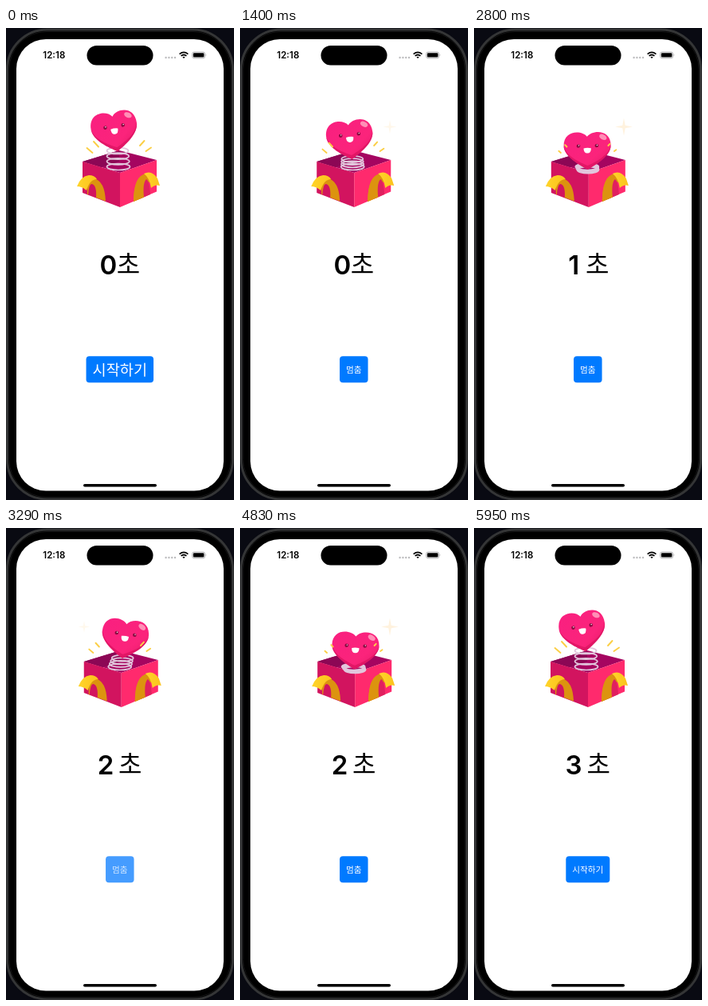
An HTML page that plays this animation: 286 px wide and 590 px high, repeating every 8260 ms.

```html
<!DOCTYPE html>
<html lang="ko">
<head>
<meta charset="utf-8">
<title>Gift timer</title>
<style>
  html, body { margin: 0; width: 100%; height: 100%; overflow: hidden; background: #090a12; }
  svg { display: block; width: 286px; height: 590px; }
  text { text-anchor: middle; }
  .num { font: 600 33px Inter, sans-serif; }
  .ko { font-family: "Noto Sans CJK KR", "Noto Sans CJK", "Noto Sans CJK JP", sans-serif; }
</style>
</head>
<body>
<svg viewBox="0 0 286 590">
  <defs>
    <linearGradient id="skin" x1="0" y1="0" x2="1" y2="1">
      <stop offset="0" stop-color="#f91f80"/>
      <stop offset=".65" stop-color="#fb247b"/>
      <stop offset="1" stop-color="#e51868"/>
    </linearGradient>
    <linearGradient id="leaf" x1="0" x2="1">
      <stop offset="0" stop-color="#ffd42a"/>
      <stop offset="1" stop-color="#fbc21c"/>
    </linearGradient>
  </defs>

  <!-- phone -->
  <rect x="1.5" y="2" width="283" height="587" rx="50" fill="#000" stroke="#343536" stroke-width="3"/>
  <rect x="4" y="4.5" width="278" height="582" rx="47" fill="none" stroke="#151516"/>
  <rect x="13" y="14" width="260" height="564.5" rx="37" fill="#fff"/>
  <rect x="101.5" y="22" width="83" height="24.5" rx="12.2"/>
  <rect x="97" y="570" width="92" height="3.4" rx="1.7"/>

  <!-- status bar -->
  <text x="60.3" y="38" style="font:600 11.5px Inter,sans-serif">12:18</text>
  <g fill="#bcbcbe">
    <circle cx="200.6" cy="37" r="1.2"/><circle cx="204.4" cy="37" r="1.2"/>
    <circle cx="208.2" cy="37" r="1.2"/><circle cx="212" cy="37" r="1.2"/>
  </g>
  <g fill="none" stroke="#000" stroke-width="1.7">
    <path d="M217.6 32.6Q223 28.1 228.4 32.6M219.6 34.9Q223 32.1 226.4 34.9"/>
    <path d="M223 38L221.4 36.4Q223 35.1 224.6 36.4Z" fill="#000" stroke="none"/>
  </g>
  <rect x="233.6" y="30" width="16" height="7.8" rx="2.4" fill="none" stroke="#a0a0a2" stroke-width=".8"/>
  <rect x="234.8" y="31.2" width="13.6" height="5.4" rx="1.4"/>
  <path d="M250.7 32.6Q252.2 33.9 250.7 35.2Z" fill="#a0a0a2"/>

  <!-- gift -->
  <g id="box">
    <path d="M96 167L142 153L189 165L143 181Z" fill="#a50560"/>
    <path d="M96 167L142 153V167L119 174Z" fill="#8c0755"/>
    <path d="M96 167L143 181V224L96 206Z" fill="#d2145f"/>
    <path d="M143 181L189 165V204.5L143 224Z" fill="#ff2a6d"/>
    <path d="M102 208V196Q102 187 110 188Q124 191 125 216.5L113 212Q114 197 108 195Q104 194 103 208.5Z" fill="#dc930f"/>
    <path d="M89 198Q94 185 104 184Q111 184 114 189Q105 189 101 203Q95 198 89 198Z" fill="url(#leaf)"/>
    <path d="M160 217Q160 184 176 182Q183 184 181 193Q173 189 173 211.5Z" fill="#dc930f"/>
    <path d="M168 213.5Q166 193 176 189Q180 191 181 208L173 211.5Z" fill="#e0205f"/>
    <path d="M160 217Q160 188 174 183L177 188Q171 192 173 211.5Z" fill="#dc930f"/>
    <path d="M173 182Q183 177 190 188L193 197Q187 195 182 200Q180 187 173 182Z" fill="url(#leaf)"/>
  </g>
  <path id="spring" fill="none" stroke="#e2c6dc" stroke-width="1.7"/>
  <g id="heart">
    <path d="M0-17C-6-26-29-27-29-5C-29 9-10 21 0 27C10 21 29 9 29-5C29-27 6-26 0-17Z" fill="url(#skin)"/>
    <path d="M29-5C29 9 10 21 0 27C-10 21-29 9-29-5C-26 9-10 17 0 22C10 17 26 9 29-5Z" fill="#d9125f" opacity=".7"/>
    <ellipse cx="19.5" cy="-16" rx="5" ry="3.2" transform="rotate(32 19.5 -16)" fill="#ff8fb6"/>
    <g fill="#8b0c43">
      <circle cx="-11" cy="-4.5" r="2.3"/><circle cx="11.5" cy="-4.5" r="2.3"/>
    </g>
    <g fill="#fff">
      <circle cx="-10.4" cy="-5.3" r=".7"/><circle cx="12.1" cy="-5.3" r=".7"/>
      <path d="M-4.6-1.4Q0-2.6 4.6-1.4Q4.6 5.3 0 5.3Q-4.6 5.3-4.6-1.4Z"/>
    </g>
  </g>
  <path id="rays" fill="none" stroke="#fbcf45" stroke-width="1.9" stroke-linecap="round"/>
  <path id="starL" fill="#fff0d8"/>
  <path id="starR" fill="#fff0d8"/>

  <!-- timer -->
  <text id="num" class="num" y="308"></text>
  <text id="unit" class="ko" y="307" font-size="32" font-weight="500">초</text>
  <rect id="btn" y="410.3" height="33" rx="4"/>
  <text id="label" class="ko" x="142.8" fill="#fff"></text>
</svg>

<script>
const LOOP = 8260, TICK = 70, BOUNCE = 630, PRESS = 140;
const RUNS = [[1260, 3360], [4480, 5950]];
const DIGIT_X = [128.5, 125.3, 125, 125];
const UNIT_X = [153.5, 154.7, 155.7, 156.2];
const BUTTONS = {
  big: { text: '시작하기', w: 84.5, size: 18.6, y: 433.8 },
  start: { text: '시작하기', w: 55, size: 10.6, y: 430.8 },
  stop: { text: '멈춤', w: 35.5, size: 10.6, y: 430.8 }
};

const el = id => document.getElementById(id);
const set = (id, attrs) => {
  for (const k in attrs) el(id).setAttribute(k, attrs[k]);
};

function star(x, y, r) {
  const q = r * 0.16;
  return `M${x} ${y - r}L${x + q} ${y - q}L${x + r} ${y}L${x + q} ${y + q}` +
    `L${x} ${y + r}L${x - q} ${y + q}L${x - r} ${y}L${x - q} ${y - q}Z`;
}

function ray(x, y, dx, dy, k) {
  return `M${x} ${y}l${dx * k} ${dy * k}`;
}

function ring(x, y, rx, ry) {
  return `M${x - rx} ${y}a${rx} ${ry} 0 1 0 ${2 * rx} 0a${rx} ${ry} 0 1 0 ${-2 * rx} 0`;
}

// One swing left-right spans two bounces.
function drawGift(p) {
  const a = Math.PI * p / BOUNCE;
  const swing = Math.cos(a), side = Math.sin(a);
  const lift = (1 + Math.cos(2 * a)) / 2;
  const x = 143.5 - 7.5 * swing;
  const y = 153 - 25.5 * lift - 0.75 * (1 - swing);
  const squash = 1 - lift;
  const tilt = 0.5 - 9 * swing;
  set('heart', { transform:
    `translate(${x} ${y}) rotate(${tilt}) scale(${1 + 0.02 * squash} ${1 - 0.07 * squash})` });

  const dx = 1 - swing;
  set('box', { transform: `translate(${dx} 0)` });

  const baseX = 141 + dx, topX = x + 4 * swing, topY = y + 25;
  let coil = '';
  for (let i = 0; i < 4; i++) {
    const k = i / 3;
    coil += ring(baseX + (topX - baseX) * k, 173.5 + (topY + 1 - 173.5) * k, 14.5 - k, 4);
  }
  set('spring', { d: coil });

  const k = 0.35 + 0.65 * lift;
  set('rays', { d:
    ray(108.5 + dx / 2, 156, -7, -6, k) + ray(116 + dx / 2, 148.5, -6, -6.5, k) +
    ray(168 + dx / 2, 147, 5.5, -6, k) + ray(175.5 + dx / 2, 154, 6.5, -4.5, k) });

  const right = Math.max(0, side), left = Math.max(0, -side);
  set('starR', { d: star(188, 123.5, 4 + 7 * right), opacity: right * 0.85 });
  set('starL', { d: star(98, 123.5, 4 + 5 * left), opacity: left * 0.75 });
}

function drawButton(kind, pressed) {
  const b = BUTTONS[kind];
  set('btn', { x: 142.8 - b.w / 2, width: b.w, fill: pressed ? '#459cff' : '#007aff' });
  set('label', { y: b.y, 'font-size': b.size, opacity: pressed ? 0.75 : 1 });
  el('label').textContent = b.text;
}

function draw(now) {
  const t = Math.floor((now % LOOP) / TICK) * TICK;
  let count = 0, phase = 0, kind = 'big', pressed = false;
  for (const [from, to] of RUNS) {
    if (t >= from - PRESS && t < from) pressed = true;
    if (t >= from) count += Math.floor((Math.min(t, to) - from) / 1000);
    if (t >= from && t < to) {
      phase = t - from;
      kind = 'stop';
      pressed = t >= to - PRESS;
    } else if (t >= to) {
      kind = 'start';
    }
  }
  drawGift(phase);
  drawButton(kind, pressed);
  el('num').textContent = count;
  set('num', { x: DIGIT_X[count] });
  set('unit', { x: UNIT_X[count] });
}

let begin;
function frame(now) {
  begin ??= now;
  draw(now - begin);
  requestAnimationFrame(frame);
}
draw(0);
requestAnimationFrame(frame);
</script>
</body>
</html>
```
